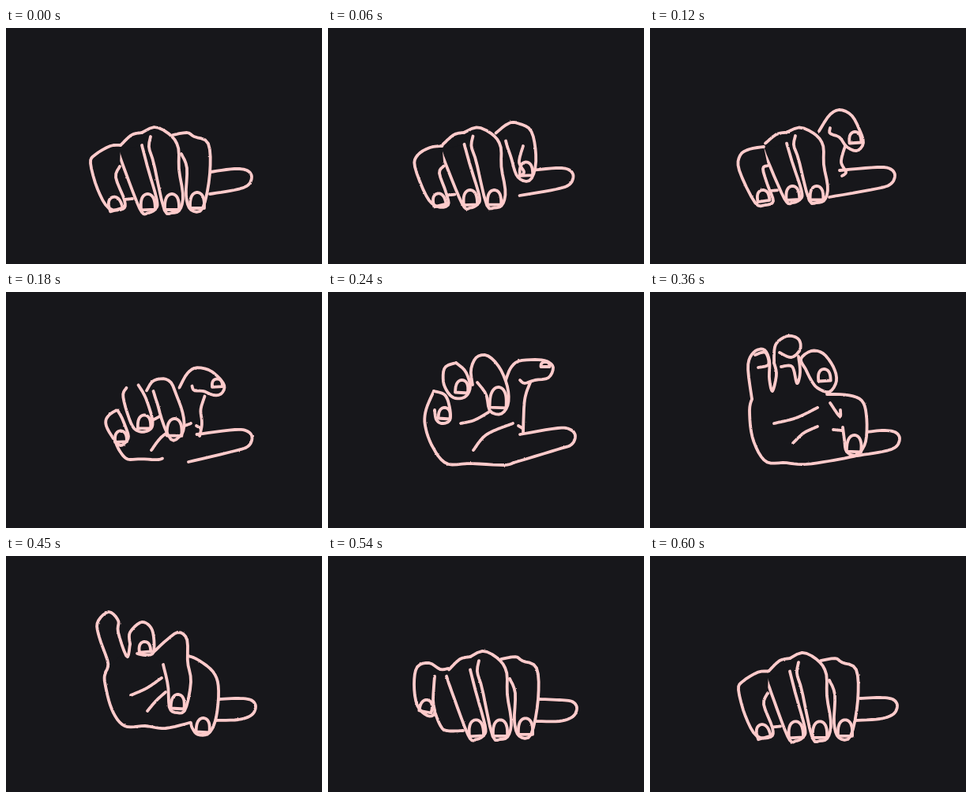
An HTML page that plays this animation: 400 px wide and 300 px high, repeating every 630 ms.

```html
<!DOCTYPE html>
<html lang="en">
<head>
<meta charset="utf-8">
<title>Drumming fingers</title>
<style>
  html, body { margin: 0; width: 100%; height: 100%; overflow: hidden; background: #17171b; }
  svg { display: block; width: 100%; height: 100%; }
  path { fill: none; stroke: #ffcbcb; stroke-width: 3.8; stroke-linecap: round; stroke-linejoin: round; }
  .finger { fill: #17171b; }
</style>
</head>
<body>
<svg viewBox="0 0 400 300">
  <filter id="crayon" filterUnits="userSpaceOnUse" x="0" y="0" width="400" height="300" color-interpolation-filters="sRGB">
    <feTurbulence id="grain" type="fractalNoise" baseFrequency=".4" numOctaves="1" result="noise"/>
    <feDisplacementMap in="SourceGraphic" in2="noise" scale="2" xChannelSelector="R" yChannelSelector="G"/>
  </filter>
  <g id="hand" filter="url(#crayon)"></g>
</svg>
<script>
const LOOP = 630, STEP = 30, SAMPLES = 36;
const FINGERS = ['index', 'middle', 'ring', 'pinky'];
const ORDER = ['thumb', 'palm', 'heart', 'life',
  ...FINGERS.flatMap(f => [f, f + 'Nail']), 'knuckle', 'pinkyFold', 'ringFold', 'web', 'tick'];

const mix = (a, b, u) => a + (b - a) * u;
const parse = text => text.split(' ').map(p => p.split(',').map(Number));
const pose = strokes => Object.fromEntries(Object.entries(strokes).map(([name, text]) => [name, parse(text)]));

// Fingers run clockwise, a thumb is root, tip, root, and a nail is cuticle, edge.
const fist = pose({
  thumb: '259,183 311,189 258,211',
  palm: '150,218 160,217',
  index: '211,136 229,133 238,138 256,147 258,185 249,229 234,231 228,213 229,178 222,160',
  middle: '172,133 189,126 208,136 218,152 219,180 224,213 220,231 210,235 200,230 187,172 181,152 183,138',
  ring: '172,149 179,176 191,219 189,230 180,235 170,231 149,177 142,157',
  pinky: '144,176 139,190 150,219 148,230 130,229 116,205 107,172 113,161 132,150 145,149',
  knuckle: '145,149 159,136 172,133',
  indexNail: '242,209 242,229', middleNail: '210,211 210,231',
  ringNail: '179,211 180,231', pinkyNail: '135,215 140,231'
});

// The fist moved sideways, with its knuckles and fingertips raised or lowered.
function moveFist(dx, knuckles, tips, changes) {
  const move = ([x, y]) => [x + dx, y + mix(knuckles, tips, (y - 130) / 105)];
  const moved = Object.entries(fist).map(([name, points]) => [name, points.map(move)]);
  return { ...Object.fromEntries(moved), ...pose(changes) };
}

const indexUp = moveFist(1, 0, -13, {
  thumb: '240,181 310,187 227,215',
  index: '214,131 227,111 240,104 255,111 265,129 270,146 262,156 249,151 240,139 228,134 228,127',
  pinky: '149,175 143,179 149,200 156,220 146,225 133,222 113,181 114,162 126,154 144,151',
  indexNail: '259,132 260,146', pinkyNail: '142,206 144,220',
  web: '247,150 242,170 248,183 243,188'
});

const open = pose({
  thumb: '243,181 313,183 235,217',
  palm: '134,126 124,150 123,170 132,196 150,218 181,218 222,220 235,217',
  index: '225,112 231,97 241,88 262,86 277,88 285,96 279,109 262,112 249,116 243,112',
  middle: '183,118 181,99 188,83 202,81 217,96 227,120 228,142 219,155 205,151 200,130 189,115',
  ring: '162,90 174,101 180,120 174,133 161,135 152,128 146,114 148,96 162,90',
  pinky: '134,126 148,131 154,147 154,163 144,167 137,162 135,150',
  indexNail: '275,89 275,95', middleNail: '216,121 215,147',
  ringNail: '170,112 169,128', pinkyNail: '148,147 147,161',
  web: '256,115 249,137 247,178', tick: '241,170 246,173',
  heart: '168,167 185,163 203,153', life: '184,201 201,181 234,167'
});

const indexDown = pose({
  thumb: '275,178 316,186 262,208',
  palm: '129,136 126,151 130,186 146,215 171,217 196,219 232,214 262,208',
  index: '224,130 250,131 268,138 274,158 273,190 262,207 249,203 246,187 244,172',
  middle: '197,98 191,85 204,75 219,78 232,95 236,113 227,127 212,122 204,112 197,98',
  ring: '157,90 159,67 174,56 188,60 190,73 179,83 164,77',
  pinky: '129,136 124,95 131,77 144,73 151,87 151,110 155,126 160,105 157,90',
  indexNail: '259,182 258,203', middleNail: '220,98 221,113',
  pinkyFold: '133,80 146,77 150,92 137,96', ringFold: '166,95 180,95 186,116 190,102 188,82',
  web: '228,141 240,158 241,150', tick: '232,175 243,176',
  heart: '157,167 185,160 212,147', life: '181,192 195,179 212,171'
});

const middleDown = pose({
  thumb: '270,182 316,191 265,209',
  palm: '126,148 125,160 134,195 150,216 176,216 202,219 236,211',
  index: '231,127 243,132 262,147 269,168 266,205 257,225 243,227 236,219 234,212',
  middle: '187,122 203,107 218,97 229,106 230,135 234,160 227,195 216,199 207,193 205,165 199,138',
  ring: '157,112 157,97 172,84 185,94 187,121 178,126 166,124',
  pinky: '126,148 129,135 118,103 116,84 130,71 142,82 142,97 153,128 157,112',
  indexNail: '250,206 249,224', middleNail: '218,176 217,194', ringNail: '175,109 176,122',
  heart: '158,177 178,168 197,155', life: '179,197 190,184 202,173'
});

const pinkyLast = moveFist(8, -5, -2, {
  thumb: '268,182 315,193 262,210',
  palm: '134,195 142,215 150,222 171,222',
  pinky: '135,153 133,183 135,200 126,203 113,190 109,163 113,141 128,136 142,144 152,143',
  pinkyNail: '126,183 123,198'
});

const closing = moveFist(5, -3, 0, { thumb: '266,181 313,190 260,209' });

// Catmull-Rom curve, sampled evenly by parameter.
function curve(points) {
  const last = points.length - 1;
  const point = i => points[Math.max(0, Math.min(last, i))];
  return Array.from({ length: SAMPLES + 1 }, (_, k) => {
    const s = k / SAMPLES * last, i = Math.min(last - 1, Math.floor(s)), u = s - i;
    return [0, 1].map(axis => {
      const [a, b, c, d] = [-1, 0, 1, 2].map(o => point(i + o)[axis]);
      return b + u / 2 * (c - a + u * (2 * a - 5 * b + 4 * c - d + u * (3 * (b - c) + d - a)));
    });
  });
}

function thumb([top, [x, y], bottom]) {
  return curve([top, [x - 22, y - 10], [x - 6, y - 8], [x, y], [x - 5, y + 11], [x - 22, y + 17], bottom]);
}

// Rounded arch over the cuticle, closed by a straight edge.
function nail([[cx, cy], [ex, ey]]) {
  const length = Math.hypot(cx - ex, cy - ey), half = (8 + length / 2) / 2;
  const ux = (cx - ex) / length, uy = (cy - ey) / length;
  const arch = Array.from({ length: SAMPLES }, (_, k) => {
    const angle = Math.PI * k / (SAMPLES - 1);
    const along = length * Math.abs(Math.sin(angle)) ** 0.6, across = half * Math.cos(angle);
    return [ex + ux * along - uy * across, ey + uy * along + ux * across];
  });
  return [...arch, arch[0]];
}

function build(name, points) {
  const shape = name === 'thumb' ? thumb : name.endsWith('Nail') ? nail : curve;
  return [name, shape(points)];
}

const keys = [[0, fist], [120, indexUp], [240, open], [360, indexDown], [450, middleDown], [540, pinkyLast], [600, closing]]
  .map(([at, strokes]) => ({
    at, strokes: Object.fromEntries(Object.entries(strokes).map(([name, points]) => build(name, points)))
  }));

const hand = document.getElementById('hand');
const grain = document.getElementById('grain');
const paths = ORDER.map(name => {
  const path = document.createElementNS(hand.namespaceURI, 'path');
  if (FINGERS.includes(name)) path.setAttribute('class', 'finger');
  return [name, hand.appendChild(path)];
});

function render(time) {
  const i = keys.findLastIndex(key => key.at <= time);
  const from = keys[i], to = keys[i + 1] || from;
  const u = to === from ? 0 : (time - from.at) / (to.at - from.at);
  const near = u < 0.5 ? from : to;
  for (const [name, path] of paths) {
    const shape = near.strokes[name];
    const a = from.strokes[name] || shape, b = to.strokes[name] || shape;
    path.setAttribute('d', shape
      ? 'M' + a.map((p, k) => p.map((v, axis) => mix(v, b[k][axis], u).toFixed(1))).join('L')
      : '');
  }
}

let shown = -1;
function draw() {
  const step = Math.floor(performance.now() % LOOP / STEP);
  if (step !== shown) {
    shown = step;
    render(step * STEP);
    grain.setAttribute('seed', step + 1);
  }
  requestAnimationFrame(draw);
}
draw();
</script>
</body>
</html>
```
